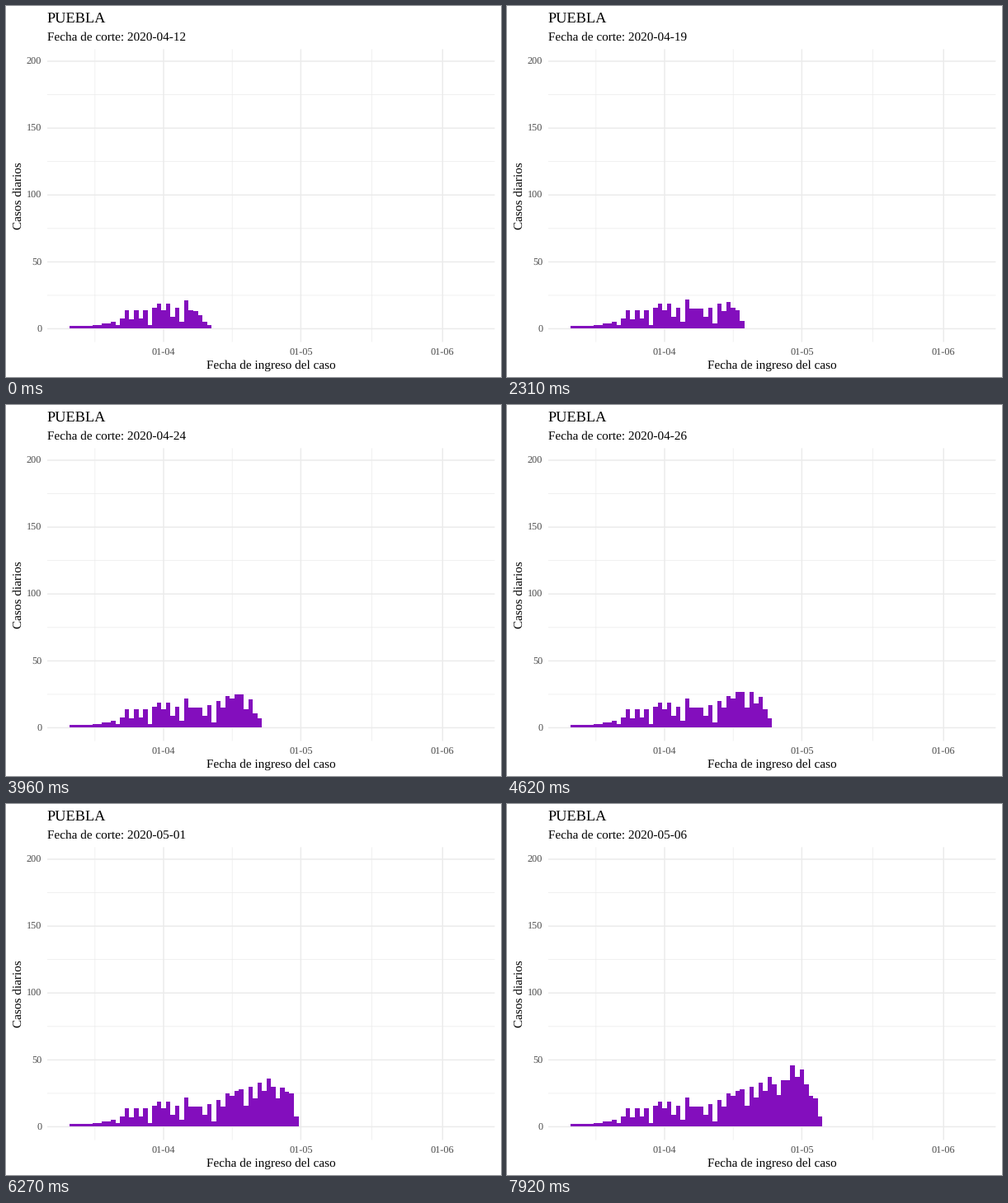
Write a matplotlib script that moves like this. It is 600x450 px and loops after 8000 ms.

```python
import matplotlib.pyplot as plt
import numpy as np
from matplotlib.animation import FuncAnimation

plt.rcParams["font.family"] = "Liberation Serif"
plt.rcParams["text.hinting"] = "no_hinting"

LOOP, TICK, HOLD = 8000, 20, 330
LEFT, RIGHT, TOP, BOTTOM = 50, 592.4, 52.4, 407.5
X_APRIL, DAY_W = 191, 5.545       # pixel of 1 April, pixels per day
Y_ZERO, CASE_H = 391.49, 1.6225   # pixel of zero, pixels per case
GRID, PURPLE, GREY = "#EBEBEB", "#830EBD", "#4D4D4D"
MINOR, MAJOR = 0.53, 1.07

# Key points of the daily trend; day 0 is 12 March
KEY_DAYS = [0, 6, 10, 11, 16, 19, 23, 25, 29, 32, 36, 40, 43, 46, 48, 54]
KEY_CASES = [2, 3, 5, 10.5, 11, 18, 12, 19, 11.5, 16, 27, 26, 34, 34, 44, 42]
SWING, PERIOD, PEAK = 4.5, 2.25, 11.8
SUNDAY_DIP = 10
LATE = range(10, 15)              # cut-offs that lag one more day


def admissions(day):
    """Full number of cases per day: trend, short swing and quiet Sundays."""
    trend = np.interp(day, KEY_DAYS, KEY_CASES)
    swing = SWING * np.cos(2 * np.pi * (day - PEAK) / PERIOD)
    change = np.where(day % 7 == 3, -SUNDAY_DIP, swing)
    return trend + change * np.minimum(1, trend / 12) ** 2


def counts(k):
    """Cases known at cut-off k; each day fills up as reports come in."""
    days = np.arange(31 + k - (k in LATE))
    age = days[::-1]
    known = 1 - 0.8 * np.exp(-age / 2)
    return np.maximum(1, np.round(admissions(days) * known))


def bars(k):
    n = counts(k)
    edges = X_APRIL + (np.arange(len(n) + 1) - 20.5) * DAY_W
    return np.round(Y_ZERO - n * CASE_H), np.round(edges)


def subtitle(k):
    month, day = divmod(11 + k, 30)
    return f"Fecha de corte: 2020-{month + 4:02d}-{day + 1:02d}"


fig = plt.figure(figsize=(6, 4.5), dpi=100, facecolor="white")
ax = fig.add_axes([0, 0, 1, 1])
ax.set_xlim(0, 600)
ax.set_ylim(450, 0)
ax.axis("off")


def label(x, y, s, size=11, color="black", **kw):
    return ax.text(x, y, s, fontsize=size, color=color, va="baseline", **kw)


def line(xs, ys, width):
    ax.plot(xs, ys, color=GRID, lw=width, snap=False, solid_capstyle="butt")


def hline(value, width):
    y = Y_ZERO - value * CASE_H
    line([LEFT, RIGHT], [y, y], width)
    return y


def vline(day, width):
    x = X_APRIL + day * DAY_W
    line([x, x], [TOP, BOTTOM], width)
    return x


for value in range(25, 200, 50):
    hline(value, MINOR)
for day in (-15, 15, 45.5):
    vline(day, MINOR)
for value in range(0, 201, 50):
    y = hline(value, MAJOR)
    label(43.3, y + 4.1, str(value), 8.8, GREY, ha="right")
for month, day in zip((4, 5, 6), (0, 30, 61)):
    x = vline(day, MAJOR)
    label(x, 423.5, f"01-{month:02d}", 8.8, GREY, ha="center")

label(49.4, 20.5, "PUEBLA", 13.2)
cutoff = label(50, 42, subtitle(0))
label((LEFT + RIGHT) / 2, 440, "Fecha de ingreso del caso", ha="center")
label(18.5, (TOP + BOTTOM) / 2, "Casos diarios", ha="center", rotation=90,
      rotation_mode="anchor")

tops, edges = bars(0)
hist = ax.stairs(tops, edges, baseline=round(Y_ZERO), fill=True,
                 color=PURPLE, lw=0, zorder=3)


def update(i):
    k = int((i + 0.5) * TICK) // HOLD
    tops, edges = bars(k)
    hist.set_data(tops, edges, round(Y_ZERO))
    cutoff.set_text(subtitle(k))
    return hist, cutoff


anim = FuncAnimation(fig, update, frames=LOOP // TICK, interval=TICK,
                     repeat=True, repeat_delay=0, blit=False)
plt.show()
```
